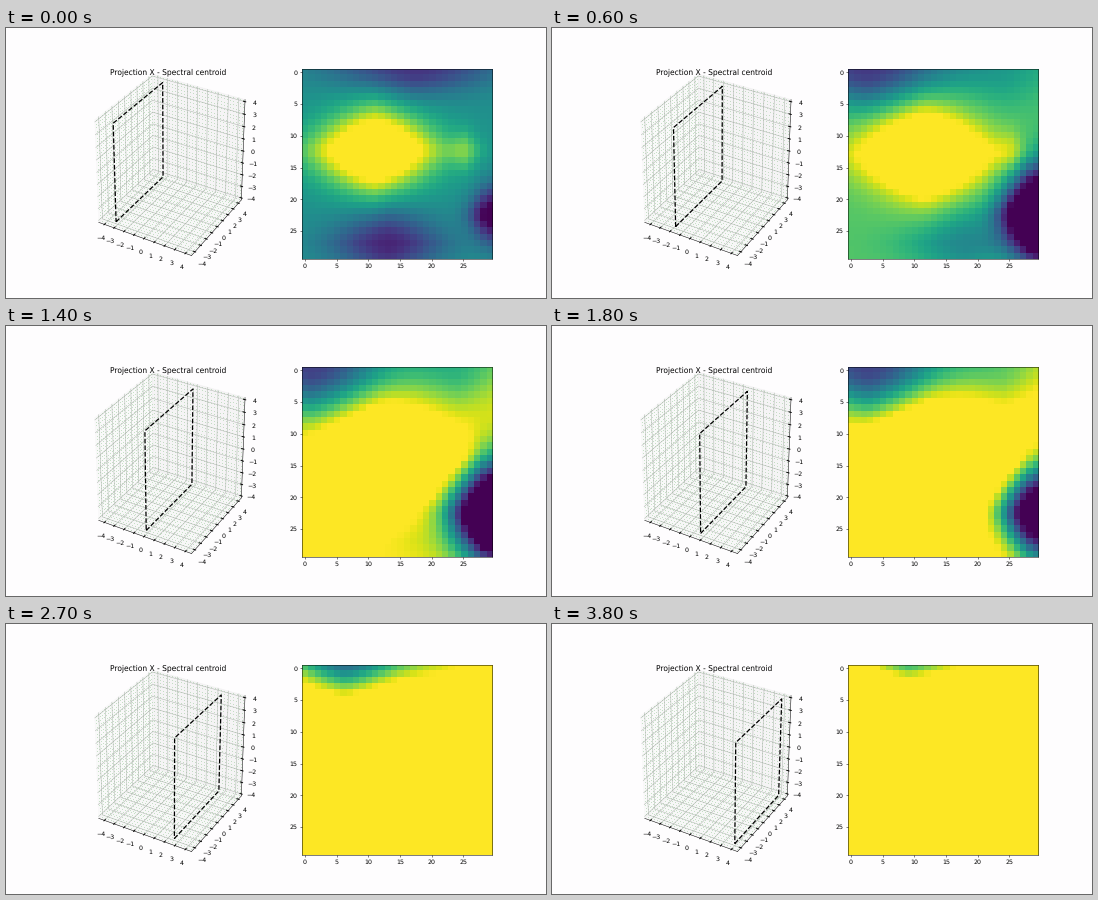
Write a matplotlib script that moves like this. It is 540 by 270 pixels and loops after 3900 ms.

```python
import numpy as np
import matplotlib.pyplot as plt
from matplotlib.animation import FuncAnimation

FRAMES, STEP_MS = 39, 100
N = 30                      # samples along each axis of the volume
EDGE = 0.5 * 25 / 24        # panes reach slightly past the axis limits
SPAN = 4 / 8.8              # half width of the sampled volume (x and y)
LABEL = EDGE + 0.0723       # distance of the tick labels from the centre
PAPER = "#fefdfe"

plt.rcParams["font.family"] = "DejaVu Sans"
plt.rcParams["text.hinting"] = "none"


# ---- perspective view of a unit cube centred on the origin ----
def project(points):
    elev, azim, dist = np.radians(30), np.radians(-60), 10
    normal = np.array([np.cos(azim) * np.cos(elev),
                       np.sin(azim) * np.cos(elev), np.sin(elev)])
    right = np.array([-np.sin(azim), np.cos(azim), 0])
    up = np.cross(normal, right)
    points = np.asarray(points, float)
    depth = dist - points @ normal
    return points @ right / depth, points @ up / depth


def to_cube(value, axis):
    return value / (8 if axis == 2 else 8.8)


def draw_line(ax, points, **style):
    return ax.plot(*project(points), **style)[0]


def draw_pane(ax, axis, side, gray):
    """One wall of the box, dusted with the sampled points behind it."""
    others = [i for i in range(3) if i != axis]

    def on_wall(u, v):
        points = np.full((len(u), 3), side * EDGE)
        points[:, others[0]], points[:, others[1]] = u, v
        return points

    corners = on_wall(EDGE * np.array([-1, 1, 1, -1]),
                      EDGE * np.array([-1, -1, 1, 1]))
    ax.fill(*project(corners), color=str(gray), alpha=0.35, lw=1, zorder=1)

    u, v = np.meshgrid(*[np.linspace(-0.5, 0.5, N)] * 2)
    draw_line(ax, on_wall(u.ravel(), v.ravel()), ls="none", marker=",",
              color="green", alpha=0.2, zorder=2)


def draw_axis(ax, axis, corner, tick_dir):
    """Grid, spine, ticks and labels of one axis; corner holds the fixed signs."""
    corner = np.array(corner, float)
    others = [i for i in range(3) if i != axis]
    back = np.array([-1, 1, -1]) * EDGE

    ends = np.array([corner * EDGE, corner * EDGE])
    ends[:, axis] = -EDGE, EDGE
    draw_line(ax, ends, color="black", lw=0.8, zorder=3)

    for value in range(-4, 5):
        pos = to_cube(value, axis)

        # the grid line bends where the two panes meet
        grid = np.array([back, back, back])
        grid[0, others[0]] *= -1
        grid[2, others[1]] *= -1
        grid[:, axis] = pos
        draw_line(ax, grid, color="#abb4ab", lw=0.8, zorder=2)

        tick = np.array([corner * EDGE, corner * EDGE])
        tick[:, axis] = pos
        tick[0, tick_dir] += corner[tick_dir] * 0.1 / 12
        tick[1, tick_dir] -= corner[tick_dir] * 0.2 / 12
        draw_line(ax, tick, color="black", lw=1.5, zorder=3)

        spot = corner * LABEL
        spot[axis] = pos
        x, y = project(spot)
        ax.text(x, y, str(value).replace("-", "\u2212"), fontsize=10,
                ha="center", va="top")


def plane_outline(index):
    x = -SPAN + 2 * SPAN * index / (N - 1)
    s = SPAN
    return project([(x, -s, -0.5), (x, s, -0.5), (x, s, 0.5),
                    (x, -s, 0.5), (x, -s, -0.5)])


# ---- scalar field: a rising level with one bright core and dark pockets ----
ROW, COL = np.mgrid[0:N, 0:N]


def bump(cx, cy, width, height, power=1.4):
    """Soft bump whose contours lie between an ellipse and a diamond."""
    d = (np.abs((COL - cx) / width) ** power
         + np.abs((ROW - cy) / height) ** power) ** (1 / power)
    return np.exp(-d ** 2)


def field(index):
    t = (index - 3) / 26
    core = 0.9 * bump(11 + 3 * t, 12.5 + 3 * t, 9.8, 6.5)
    spot = 0.2 * max(0, 1 - 2 * t) * bump(25, 12.5, 2.5, 3)

    # the upper pocket slides left, then drifts out over the top edge
    top = (0.35 + 1.1 * t) * bump(np.interp(t, [0, 0.2, 0.42, 1], [17, 2, 1, 9]),
                                  -10.4 * max(0, t - 0.55),
                                  13, min(7.3, 4 + 8 * t))
    corner = min(0.8 * t, 0.33) * bump(24, 0, 9, 6)

    # the right pocket swells and shrinks again
    depth = max(0, 1.7 - 8 * (t - 0.38) ** 2)
    size = 2 + 2.3 * depth
    right = depth * bump(29, 22.5, size, 1.35 * size)
    bottom = 0.4 * max(0, 1 - 1.8 * t) * bump(13 + 25 * t, 27, 9, 5.5)

    total = 0.5 + 1.2 * t + core + spot - top - corner - right - bottom
    return np.clip(total, 0, 1)


def slice_at(frame):
    return min(N - 1, int(0.76 * frame + 3.725))


# ---- figure ----
fig = plt.figure(figsize=(12, 6), dpi=45, facecolor=PAPER)

view = fig.add_axes([0.125, 0.11, 0.35227, 0.77])
view.set_axis_off()
view.set_title("Projection X - Spectral centroid", fontsize=12, y=0.92, pad=4.5)
draw_pane(view, 0, -1, 0.95)
draw_pane(view, 1, 1, 0.90)
draw_pane(view, 2, -1, 0.925)
draw_axis(view, 0, (0, -1, -1), 1)
draw_axis(view, 1, (1, 0, -1), 0)
draw_axis(view, 2, (1, 1, 0), 0)
plane, = view.plot(*plane_outline(slice_at(0)), "k--", lw=2, zorder=5)
view.set_xlim(-0.095, 0.09)
view.set_ylim(-0.095, 0.09)

heat = fig.add_subplot(1, 2, 2)
image = heat.imshow(field(slice_at(0)), cmap="viridis", vmin=0, vmax=1,
                    interpolation="nearest")
heat.set_xticks(range(0, N, 5))
heat.set_yticks(range(0, N, 5))


def update(frame):
    index = slice_at(frame)
    plane.set_data(*plane_outline(index))
    image.set_data(field(index))
    return plane, image


anim = FuncAnimation(fig, update, frames=FRAMES, interval=STEP_MS, repeat=True)
plt.show()
```
